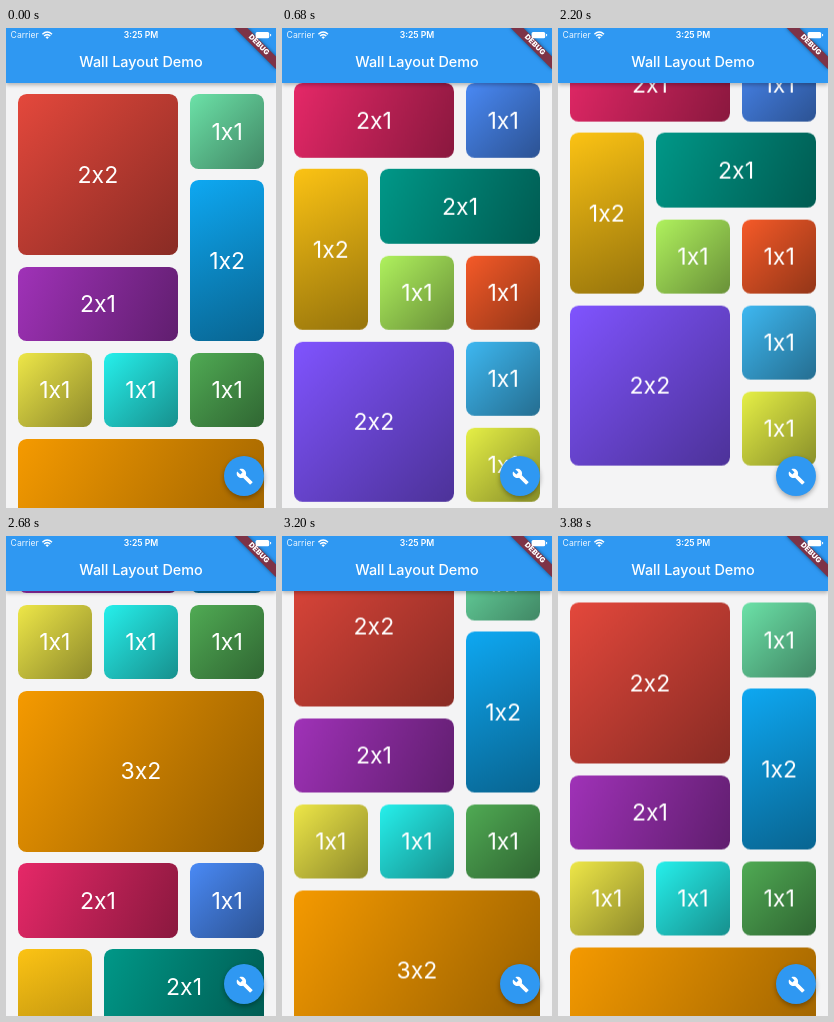
An HTML page that plays this animation: 270 px wide and 480 px high, repeating every 3.92 s.

```html
<!DOCTYPE html>
<html lang="en">
<head>
<meta charset="utf-8">
<title>Wall Layout Demo</title>
<style>
  html, body { margin: 0; width: 100%; height: 100%; overflow: hidden; }
  body { position: relative; background: #f4f4f5; color: #fff; font-family: Inter, Roboto, sans-serif; }
  body > *, #wall div { position: absolute; }
  #wall { inset: 0; will-change: transform; }
  #wall div {
    display: flex; align-items: center; justify-content: center;
    border-radius: 8.64px; font-size: 23.04px;
  }
  header {
    left: 0; top: 0; width: 270px; height: 54.7px; background: #2f98f2;
    box-shadow: 0 1.5px 4px rgba(0, 0, 0, .27);
  }
  header * { position: absolute; white-space: nowrap; }
  h1 { margin: 0; top: 14.4px; width: 100%; text-align: center; font: 500 14.4px/40.3px Inter, Roboto, sans-serif; }
  .carrier, .clock { top: 0; font-size: 8.64px; line-height: 14.4px; }
  .carrier { left: 4.6px; opacity: .9; }
  .clock { width: 100%; text-align: center; font-weight: 600; }
  .debug {
    left: 241.2px; top: 20.16px; width: 57.6px; height: 8.64px;
    transform-origin: 28.8px -20.16px; transform: rotate(45deg);
    background: #7d3347; box-shadow: 0 0 4px rgba(0, 0, 0, .5);
    text-align: center; font-size: 7.34px; font-weight: 900; line-height: 8.64px;
  }
  .status { left: 0; top: 0; }
  .fab {
    left: 218.2px; top: 428.2px; width: 40.3px; height: 40.3px; border-radius: 50%;
    background: #2f98f2; box-shadow: 0 2.2px 5px rgba(0, 0, 0, .33);
  }
  .fab svg { position: absolute; left: 11.5px; top: 11.5px; }
</style>
</head>
<body>
<div id="wall"></div>
<header>
  <h1>Wall Layout Demo</h1>
  <span class="carrier">Carrier</span>
  <span class="clock">3:25 PM</span>
  <div class="debug">DEBUG</div>
  <svg class="status" width="270" height="15" fill="none" stroke="#fff">
    <path d="M36.4 6.2Q41.2 1.8 46 6.2M38.1 8Q41.2 5.2 44.3 8" stroke-width="1.5"/>
    <path d="M39.5 9.2Q41.2 7.8 42.9 9.2L41.2 11Z" fill="#fff" stroke="none"/>
    <rect x="249.6" y="3.9" width="13.6" height="6.4" rx="1.5" fill="#fff" stroke="none"/>
    <path d="M264.6 6v2.2"/>
  </svg>
</header>
<div class="fab">
  <svg width="17.3" height="17.3" viewBox="0 0 24 24" fill="#fff">
    <path d="M22.7 19l-9.1-9.1c.9-2.3.4-5-1.5-6.9-2-2-5-2.4-7.4-1.3L9 6 6 9 1.6 4.7C.4 7.1.9 10.1 2.9 12.1c1.9 1.9 4.6 2.4 6.9 1.5l9.1 9.1c.4.4 1 .4 1.4 0l2.3-2.3c.5-.4.5-1.1.1-1.4z"/>
  </svg>
</div>
<script>
const LOOP = 3920, STEP = 40;
const GAP = 11.52, CELL = 74.64, PITCH = CELL + GAP, TOP = 66.24;
const END = 564.4; // full scroll extent

// column, row, columns wide, rows high, colour
const tiles = [
  [0, 0, 2, 2, '#e4483c'], [2, 0, 1, 1, '#6ce2a8'], [2, 1, 1, 2, '#0ea8f2'],
  [0, 2, 2, 1, '#a032b8'], [0, 3, 1, 1, '#eee748'], [1, 3, 1, 1, '#26f0ec'],
  [2, 3, 1, 1, '#50ab54'], [0, 4, 3, 2, '#f59a00'], [0, 6, 2, 1, '#e62868'],
  [2, 6, 1, 1, '#4a8af6'], [0, 7, 1, 2, '#fcc314'], [1, 7, 2, 1, '#009888'],
  [1, 8, 1, 1, '#b0f25e'], [2, 8, 1, 1, '#f65a28'], [0, 9, 2, 2, '#8054ff'],
  [2, 9, 1, 1, '#3eb8f2'], [2, 10, 1, 1, '#e6f046'],
];
const wall = document.getElementById('wall');
const span = n => n * PITCH - GAP;

for (const [col, row, cols, rows, color] of tiles) {
  const tile = document.createElement('div');
  const w = span(cols), h = span(rows);
  const angle = Math.PI / 2 + Math.atan2(h, w);
  tile.textContent = `${cols}x${rows}`;
  tile.style.cssText = `left:${GAP + col * PITCH}px;top:${TOP + row * PITCH}px;width:${w}px;height:${h}px;` +
    `background:linear-gradient(${angle}rad,${color},color-mix(in srgb,${color} 60%,black))`;
  wall.append(tile);
}

// Distance after t seconds: finger drag, fling with friction, then an overdamped bounce at END.
function swipe(t, dragTime, dragDist, speed) {
  if (t <= 0) return 0;
  if (t < dragTime) return dragDist * (t / dragTime) ** (speed * dragTime / dragDist);
  const s = t - dragTime, rest = END - dragDist;
  const hit = -Math.log(1 - 2 * rest / speed) / 2;
  if (s < hit) return dragDist + speed / 2 * (1 - Math.exp(-2 * s));
  const slow = 9.08, fast = 22.04, b = s - hit;
  return END + (speed - 2 * rest) / (fast - slow) * (Math.exp(-slow * b) - Math.exp(-fast * b));
}

function scrollAt(ms) {
  if (ms < 1280) return swipe((ms - 40) / 1000, .16, 130.8, 1288);
  return END - swipe((ms - 2280) / 1000, .14, 97.9, 1038);
}

let start;
function draw(now) {
  start ??= now;
  const ms = Math.floor((now - start) % LOOP / STEP) * STEP;
  wall.style.transform = `translateY(${-scrollAt(ms)}px)`;
  requestAnimationFrame(draw);
}
requestAnimationFrame(draw);
</script>
</body>
</html>
```
